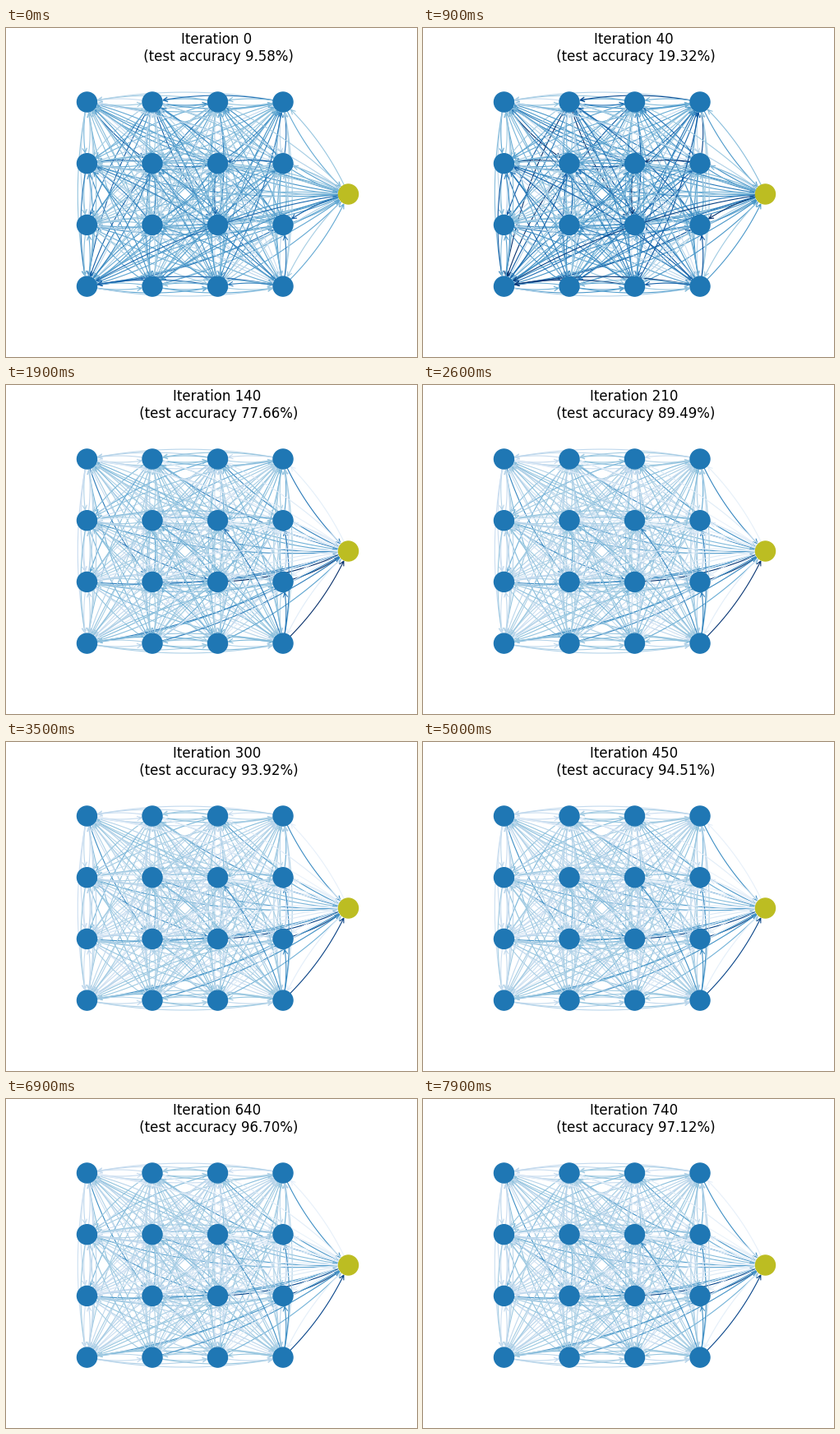
Animation, 500 px wide and 400 px high, one loop 8 s. Source, as a matplotlib script:

```python
import math

import matplotlib.pyplot as plt
import numpy as np
from matplotlib.animation import FuncAnimation
from matplotlib.collections import PathCollection
from matplotlib.path import Path

plt.rcParams["font.family"] = "DejaVu Sans"

FRAMES, INTERVAL, HOLD = 80, 100, 5
DPI = 100
PX = DPI / 72
NODE_SIZE = 300
RAD = 0.1
EDGE_WIDTH = 0.8

# Four by four hidden neurons, row by row, then the output; pixels, y down.
OUT = 16
nodes = np.array([(98.5 + 79.5 * (i % 4), 90 + 74.7 * (i // 4)) for i in range(OUT)]
                 + [(416.5, 202)])
edges = [(i, j) for i in range(OUT + 1) for j in range(OUT + 1) if i != j]
sources, targets = np.array(edges).T

# Edges (source, target) that stand out before and after training.
EARLY_STRONG = [(1, 10), (0, 5), (5, 4), (7, 6), (6, 10), (OUT, 11), (1, 12), (5, 12)]
LATE_STRONG = [(10, OUT), (11, OUT), (15, OUT)]
LATE_MEDIUM = [(1, OUT), (3, OUT), (15, 6), (15, 7), (15, 11), (4, 10), (0, 9)]

ACCURACY = {0: 9.58, 40: 19.32, 140: 77.66, 200: 89, 300: 93.92,
            450: 94.51, 540: 96.28, 740: 97.12}


def smoothstep(x):
    x = min(max(x, 0), 1)
    return x * x * (3 - 2 * x)


def edge_path(a, b):
    """Curved arrow between two nodes, trimmed at their rims."""
    dx, dy = b - a
    control = (a + b) / 2 + RAD * np.array([-dy, dx])
    rim = math.sqrt(NODE_SIZE) / 2 * PX

    def curve(t):
        t = t[:, None]
        return (1 - t) ** 2 * a + 2 * t * (1 - t) * control + t ** 2 * b

    t = np.linspace(0, 1, 1001)
    points = curve(t)
    outside = t[(np.hypot(*(points - a).T) > rim) & (np.hypot(*(points - b).T) > rim)]
    line = curve(np.linspace(outside[0], outside[-1], 28))

    back = line[-2] - line[-1]
    back /= np.hypot(*back)
    side = np.array([-back[1], back[0]])
    tip = line[-1] + back * EDGE_WIDTH * PX / 2 / math.sin(math.atan2(2, 4))
    line[-1] = tip
    root = tip + back * 4 * PX
    head = [root + side * 2 * PX, tip, root - side * 2 * PX]
    codes = [Path.MOVETO] + [Path.LINETO] * 27 + [Path.MOVETO] + [Path.LINETO] * 2
    return Path(np.vstack([line, head]), codes)


def highlight(weights, chosen, value):
    weights[tuple(np.transpose(chosen))] = value


# Random weights first; training then favours the edges into the output.
rng = np.random.default_rng(7)
early = rng.beta(1.8, 2.6, (OUT + 1, OUT + 1))
late = (early + rng.beta(1.8, 2.8, early.shape)) / 2
early[:, 12] += 0.2
early[:, OUT] = 0.45 + 0.3 * early[:, OUT]
highlight(early, EARLY_STRONG, 1)
late = 0.13 + 0.45 * late
late[OUT] *= 0.35
late[:, OUT] = 0.42 + 0.2 * rng.random(OUT + 1)
highlight(late, LATE_MEDIUM, 0.63)
highlight(late, LATE_STRONG, 0.92)
early, late = early[sources, targets], late[sources, targets]


def edge_strengths(iteration):
    growth = smoothstep(iteration / 40)
    trained = smoothstep((iteration - 40) / 100)
    settling = 1 + 0.14 * math.exp(-max(0, iteration - 140) / 80)
    start = 0.2 - 0.03 * growth + (0.62 + 0.2 * growth) * early
    return np.clip((1 - trained) * start + trained * settling * late, 0, 1)


fig = plt.figure(figsize=(5, 4), dpi=DPI, facecolor="white")
ax = fig.add_subplot()
ax.axis("off")

arrows = PathCollection([edge_path(nodes[i], nodes[j]) for i, j in edges],
                        facecolors="none", linewidths=EDGE_WIDTH, zorder=1)
ax.add_collection(arrows)
ax.scatter(*nodes.T, s=NODE_SIZE, c=["#1f77b4"] * OUT + ["#bcbd22"],
           linewidths=1, zorder=2)
ax.set_xlim(62.5, 450)
ax.set_ylim(356, 48)
title = ax.set_title("", fontsize=12)


def update(frame):
    iteration = max(0, frame - HOLD) * 10
    arrows.set_edgecolor(plt.cm.Blues(edge_strengths(iteration)))
    accuracy = np.interp(iteration, list(ACCURACY), list(ACCURACY.values()))
    title.set_text(f"Iteration {iteration}\n (test accuracy {accuracy:.2f}%)")
    return arrows, title


anim = FuncAnimation(fig, update, frames=FRAMES, interval=INTERVAL,
                     repeat=True, repeat_delay=0, blit=False)
plt.show()
```
